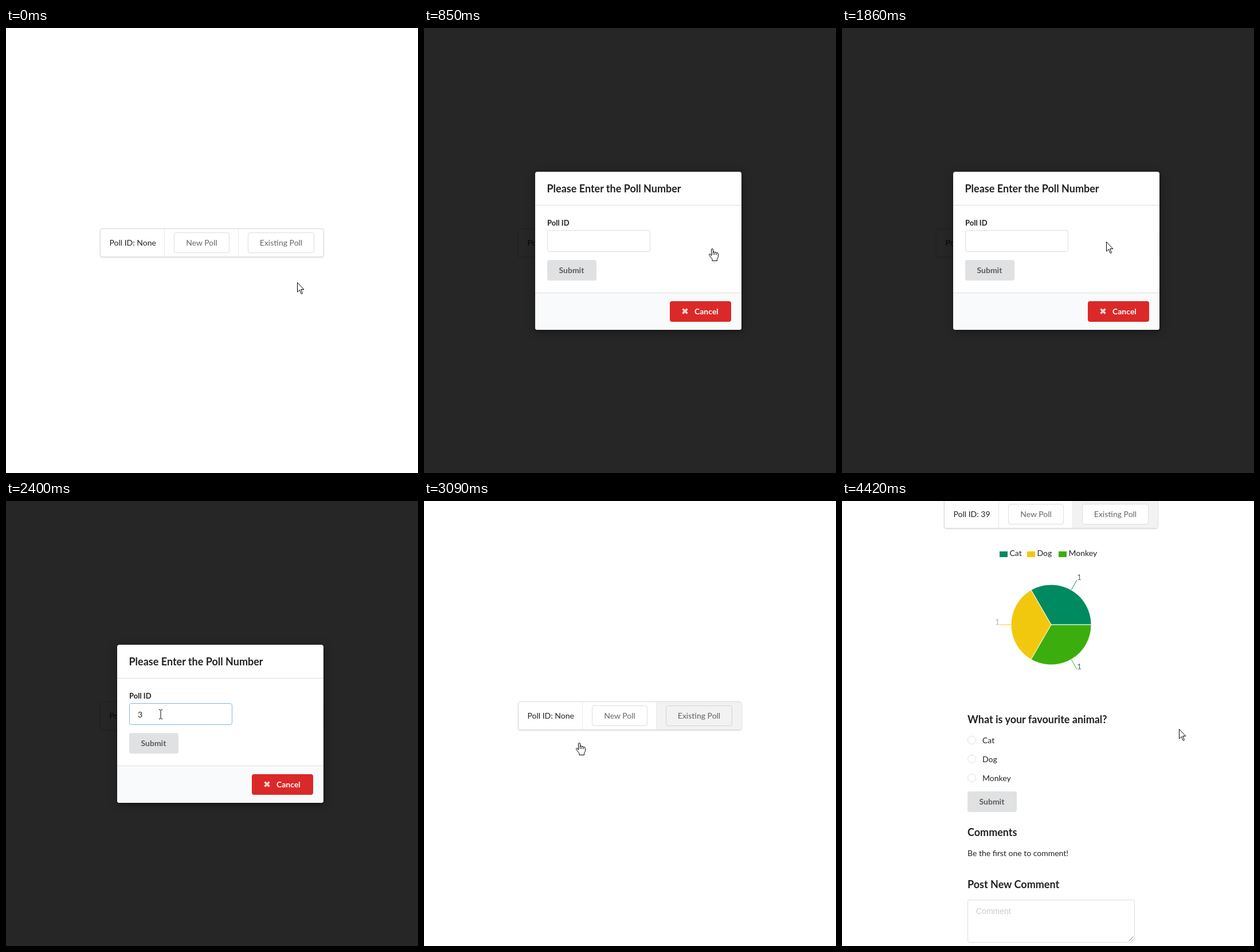
Recreate the animation shown at these times as an HTML page. Size 719x777 px, loop 4970 ms.

```html
<!DOCTYPE html>
<html lang="en">
<head>
<meta charset="utf-8">
<title>Poll</title>
<style>
  html, body { margin: 0; width: 100%; height: 100%; overflow: hidden; background: #fff; }
  svg { display: block; width: 719px; height: 777px; }
  text { font: 14px Lato, sans-serif; fill: rgba(0,0,0,.87); white-space: pre; }
  .head { font-size: 18px; font-weight: 700; }
  .label { font-size: 13px; font-weight: 700; }
  .bold { font-weight: 700; }
  .soft { fill: rgba(0,0,0,.6); }
  .hint { font-family: "Liberation Sans", Arial, sans-serif; fill: #c8cec6; }
  .box { fill: #fff; stroke: #dededf; }
  .rule { fill: #dededf; }
  .panel { fill: #fff; stroke: #d8d9da; filter: drop-shadow(0 1px 1px rgba(34,36,38,.15)); }
  .modal { filter: drop-shadow(1px 3px 2px rgba(0,0,0,.2)) drop-shadow(1px 3px 8px rgba(0,0,0,.3)); }
  .cursor { fill: #fff; stroke: #000; stroke-linejoin: round; }
</style>
</head>
<body>
<svg viewBox="0 0 719 777">
  <g id="home"></g>

  <g id="dialog">
    <rect width="719" height="777" fill="rgba(0,0,0,.85)"/>
    <rect class="modal" x="194" y="251" width="360" height="276" rx="4" fill="#fff"/>
    <path d="M194 463H554V523a4 4 0 0 1-4 4H198a4 4 0 0 1-4-4Z" fill="#f9fafb"/>
    <rect class="rule" x="194" y="309" width="360" height="1"/>
    <rect class="rule" x="194" y="462" width="360" height="1"/>
    <text class="head" x="214.5" y="286.500">Please Enter the Poll Number</text>
    <text class="label" x="215" y="345">Poll ID</text>
    <rect id="field" class="box" x="215.500" y="353.500" width="179" height="37" rx="3.500"/>
    <text id="typed" x="230" y="378"></text>
    <rect id="caret" x="230" y="364" width="1" height="16"/>
    <rect id="send" x="215" y="405" width="86" height="36" rx="4"/>
    <text id="sendText" class="bold" x="235.500" y="428">Submit</text>
    <rect x="429" y="477" width="107" height="36" rx="4" fill="#db2828"/>
    <path d="M451.500 490.500l8 8m0-8l-8 8" stroke="#f4d4d4" stroke-width="3.600"/>
    <text class="bold" x="472" y="500" style="fill:#fff">Cancel</text>
  </g>

  <g id="poll"></g>

  <circle id="dot" r="12" fill="rgba(255,245,10,.6)"/>
  <g id="arrow" class="cursor">
    <path d="M.5.5V17L4.300 13.400 7.300 20.300Q8.600 20.800 9.500 19.400L6.700 12.500H11.800Z"/>
  </g>
  <g id="hand" class="cursor">
    <path d="M-.5 12.500V2Q-.5.5 1 .5T2.500 2V7Q2.600 5.600 4 5.700T5.500 7.500Q5.700 6.300 7 6.500T8.500 8.500Q8.700 7.400 10 7.600T11.500 9.500V14.500L9.500 18.500V21.500H1V18.500L-3.800 12.500Q-5.200 10.300-3.800 9.500-2.400 9-.5 12.500Z"/>
    <path d="M2.500 7v4M5.500 7.500V11M8.500 8.500V11" fill="none"/>
  </g>
  <path id="beam" d="M-3 .5H-1L0 1.500 1 .5H3M0 1.500V15.500M-3 16.500H-1L0 15.500 1 16.500H3" fill="none" stroke="#000"/>
</svg>

<script>
const LOOP = 4970;
const $ = id => document.getElementById(id);
const text = (x, y, s, cls = '') => `<text class="${cls}" x="${x}" y="${y}">${s}</text>`;
const show = (el, on) => el.setAttribute('visibility', on ? 'visible' : 'hidden');

function menu(x, split, y, label) {
  const end = split + 278;
  const button = (bx, w, s, cls) =>
    `<rect class="box ${cls}" x="${bx + .5}" y="${y + 7.5}" width="${w - 1}" height="35" rx="3.5"/>` +
    `<text class="soft ${cls}Text" x="${bx + w / 2}" y="${y + 30}" text-anchor="middle">${s}</text>`;
  return `<rect class="panel" x="${x + .5}" y="${y + .5}" width="${end - x - .5}" height="49" rx="3.5"/>
    <path class="item" d="M${split + 130} ${y + 1}H${end - 3}q3 0 3 3V${y + 46}q0 3-3 3H${split + 130}Z" fill="#f2f2f2"/>
    <rect x="${split}" y="${y + 1}" width="1" height="48" fill="#e8e9e9"/>
    <rect x="${split + 129}" y="${y + 1}" width="1" height="48" fill="#e8e9e9"/>
    ${text(x + 16.5, y + 30, label)}
    ${button(split + 17, 97, 'New Poll', 'new')}
    ${button(split + 146, 116, 'Existing Poll', 'old')}`;
}

function pie(cx, cy, r) {
  const colors = ['#008a60', '#f2c80f', '#3bae0e'];
  const at = (deg, d) => {
    const a = deg * Math.PI / 180;
    return `${cx + d * Math.cos(a)} ${cy - d * Math.sin(a)}`;
  };
  return colors.map((c, i) => {
    const from = i * 120, mid = from + 60;
    return `<path d="M${at(mid, r)}L${at(mid, r + 20)}" stroke="${c}"/>
      <path d="M${cx} ${cy}L${at(from, r)}A${r} ${r} 0 0 0 ${at(from + 120, r)}Z" fill="${c}" stroke="#fff"/>`;
  }).join('') +
    `<g style="--c:#56697c">${[[410, 138], [410, 294]].map(([x, y]) =>
      `<text x="${x}" y="${y}" style="fill:var(--c)">1</text>`).join('')}</g>
    <text x="275" y="216" text-anchor="end" style="fill:#b5b5b0">1</text>`;
}

$('home').innerHTML = menu(164, 276, 350, 'Poll ID: None');

const legend = [[275, 'Cat', '#008a60'], [323, 'Dog', '#f2c80f'], [378, 'Monkey', '#3bae0e']];
$('poll').innerHTML = menu(178, 273, -2, 'Poll ID: 39') +
  legend.map(([x, s, c], i) =>
    `<rect x="${x}" y="88" width="14" height="10" fill="${c}"/>` + text(x + 17.5, 96, s) +
    `<circle class="box" cx="226.5" cy="${417.5 + 33 * i}" r="7"/>` + text(245, 423 + 33 * i, s)
  ).join('') +
  pie(365, 216, 70) +
  text(219, 388, 'What is your favourite animal?', 'head') +
  '<rect x="219" y="507" width="86" height="36" rx="4" fill="#e0e1e2"/>' +
  text(239.5, 530, 'Submit', 'bold soft') +
  text(219, 585, 'Comments', 'head') +
  text(219, 620, 'Be the first one to comment!') +
  text(219, 676, 'Post New Comment', 'head') +
  '<rect class="box" x="219.5" y="696.5" width="291" height="74" rx="3.5"/>' +
  text(234, 721, 'Comment', 'hint') +
  '<path d="M500.5 768.5l8-8M505.500 768.500l3-3" stroke="#777"/>';

// Each move: start, end, number of jumps, then the points passed through.
const moves = [
  [150, 450, 5, [508, 444], [508, 410], [502, 385]],
  [1860, 1860, 1, [502, 385], [461, 373]],
  [1940, 2320, 6, [461, 373], [340, 260], [270, 372]],
  [2550, 2780, 4, [270, 372], [274, 400], [270, 422]],
  [3620, 4110, 7, [270, 422], [355, 430], [458, 410]],
  [4180, 4420, 4, [458, 410], [530, 404], [588, 398]]
];

function cursorAt(t) {
  let spot = moves[0][3];
  for (const [t0, t1, n, a, b, c = b] of moves) {
    if (t < t0) break;
    const step = n > 1 ? Math.floor((t - t0) / (t1 - t0) * (n - 1) + .001) + 1 : 1;
    const p = Math.min(1, step / n), q = 1 - p;
    spot = [0, 1].map(k => Math.round(q * q * a[k] + 2 * p * q * b[k] + p * p * c[k]));
  }
  return spot;
}

const home = $('home');
const item = home.querySelector('.item');
const old = home.querySelector('.old'), oldText = home.querySelector('.oldText');

function draw(t) {
  const within = (a, b) => t >= a && t < b;
  const [x, y] = cursorAt(t);

  // Opening menu
  const hover = within(375, 850), closed = t >= 3090;
  show(home, t < 3240);
  show(item, t >= 700 && t < 3240);
  item.setAttribute('fill', closed ? '#f2f2f2' : '#f7f7f7');
  old.style.fill = closed ? 'none' : t >= 700 ? '#f9f9f9' : '#fff';
  old.style.stroke = hover ? '#c4c5c6' : closed ? '#d3d3d4' : '';
  oldText.style.fill = hover ? 'rgba(0,0,0,.82)' : '';

  // Dialog
  const open = within(850, 3090), focus = t >= 2320;
  show($('dialog'), open);
  $('field').style.stroke = focus ? '#85b7d9' : '';
  $('typed').textContent = t >= 2480 ? '39' : t >= 2400 ? '3' : '';
  show($('caret'), open && within(2320, 2400));
  const over = t >= 2780, press = t >= 3010;
  $('send').setAttribute('fill', press ? '#c0c1c2' : over ? '#cacbcd' : '#e0e1e2');
  $('sendText').style.fill = over ? 'rgba(0,0,0,.8)' : 'rgba(0,0,0,.6)';

  show($('poll'), t >= 3240);

  // Pointer
  const kind = within(375, 1860) || within(2700, 3240) ? 'hand' : within(2250, 2630) ? 'beam' : 'arrow';
  for (const id of ['arrow', 'hand', 'beam']) {
    show($(id), id === kind);
    $(id).setAttribute('transform', `translate(${x} ${id === 'beam' ? y - 8 : y})`);
  }
  show($('dot'), within(700, 850) || within(3010, 3090));
  $('dot').setAttribute('transform', `translate(${x} ${y + 2})`);
}

const start = performance.now();
function tick() {
  draw((performance.now() - start) % LOOP);
  requestAnimationFrame(tick);
}
tick();
</script>
</body>
</html>
```
